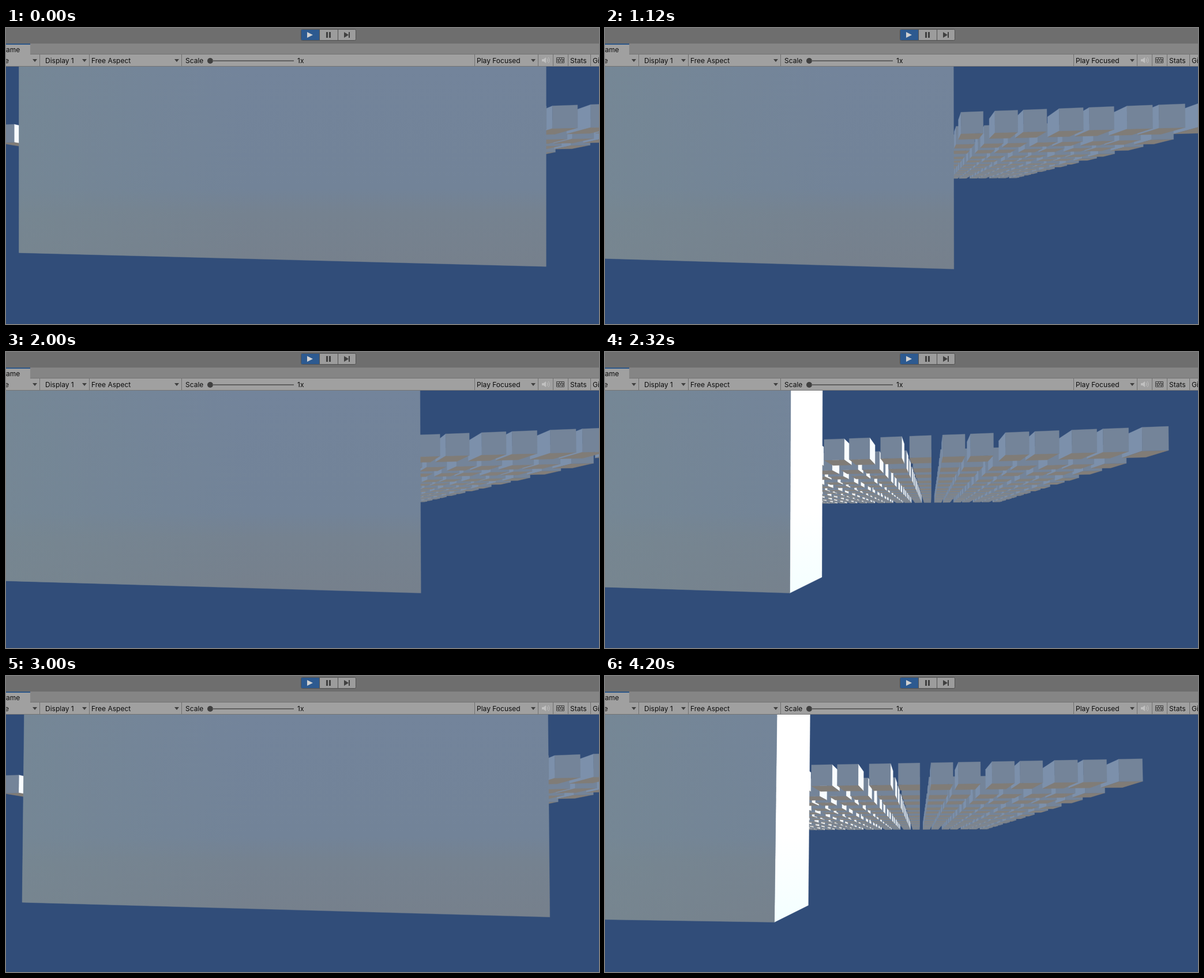
These frames come from a looping animation (1028x514 px, 5200 ms). An HTML page with a canvas:

```html
<!DOCTYPE html>
<html lang="en">
<head>
<meta charset="utf-8">
<title>Game view</title>
<style>
html, body { margin: 0; width: 100%; height: 100%; overflow: hidden; background: #314d79; }
canvas, svg { position: absolute; left: 0; top: 0; display: block; }
text { font: 12px Inter, "Liberation Sans", sans-serif; fill: #0c0c0c; }
</style>
</head>
<body>
<canvas id="view" width="1028" height="514"></canvas>
<svg width="1028" height="67" viewBox="0 0 1028 67">
  <rect width="1028" height="27" fill="#6e6e6e"/>
  <rect y="27" width="1028" height="19" fill="#858585"/>
  <rect y="27" width="42" height="19" fill="#a0a0a0"/>
  <rect y="27" width="42" height="2" fill="#2d5688"/>
  <rect y="46" width="1028" height="21" fill="#a0a0a0"/>
  <path d="M42 45.5H1028M0 66.5H1028" stroke="#747474"/>
  <path d="M58.5 46V66M144.5 46V66M304.5 46V66M812.5 46V66M922.5 46V66M948.5 46V66M974.5 46V66M1013.5 46V66" stroke="#707070"/>
  <rect x="511.500" y="2.500" width="95" height="19" rx="2" fill="#9c9c9c" stroke="#505050"/>
  <rect x="512" y="3" width="31" height="18" fill="#2d5a90"/>
  <path d="M543.500 3V21M575.500 3V21" stroke="#505050"/>
  <path d="M522 7L532 12L522 17Z" fill="#d0d0d0"/>
  <path d="M555 7h3v10h-3zM560 7h3v10h-3zM586 7L594 12L586 17ZM594 7h2v10h-2z" fill="#404040"/>
  <g fill="#404040">
    <path d="M46 54h8l-4 5zM132 54h8l-4 5zM292 54h8l-4 5zM910 54h8l-4 5z"/>
    <circle cx="354" cy="57" r="5"/>
  </g>
  <path d="M358 57H499" stroke="#606060" stroke-width="2"/>
  <path d="M929 54h3l4-3v10l-4-3h-3z" fill="#c0c0c0"/>
  <path d="M938 53q2 3 0 6M940 51q4 5 0 10" fill="none" stroke="#c0c0c0"/>
  <path d="M954.500 51.500h13v9h-13zM954 54.500h14M954 57.500h14M959.500 52v2M963.500 52v2M957.500 55v2M961.500 55v2M965.500 55v2M958.500 58v2M964.500 58v2" fill="none" stroke="#404040"/>
  <text x="0" y="42">ame</text>
  <text x="-2" y="61">e</text>
  <text x="68" y="61">Display 1</text>
  <text x="148" y="61">Free Aspect</text>
  <text x="311" y="61">Scale</text>
  <text x="505" y="61">1x</text>
  <text x="816" y="61">Play Focused</text>
  <text x="978" y="61">Stats</text>
  <text x="1017" y="61">Gi</text>
</svg>
<script>
const g = document.getElementById('view').getContext('2d');
const LOOP = 5200, TICK = 40;
const FOCAL = 390, CX = 526, CY = 293.7;
const YAW = .099, PITCH = .0085, LEFT = -5.22;
const COLS = 24, ROWS = 13;

// Each move: start, end, then poses [strafe, yaw, pitch] at both ends
const at = (strafe, yaw = YAW, pitch = PITCH) => [strafe, yaw, pitch];
const moves = [
  [0, 1, at(LEFT, .0926, 0), at(LEFT, .0926, 0)],
  [400, 401, at(LEFT), at(LEFT)],
  [880, 1400, at(-4.43), at(0)],
  [1480, 1680, at(-2.83), at(LEFT)],
  [1880, 2320, at(-4.6), at(0)],
  [2480, 3000, at(-.58), at(LEFT)],
  [3120, 3640, at(-4.23), at(0)],
  [4000, 4200, at(0, .089, .011), at(0, .0487, .021)]
];

function poseAt(time) {
  const [start, end, from, to] = moves.filter(m => m[0] <= time).pop();
  const k = Math.min(1, (time - start) / (end - start));
  return from.map((v, i) => v + (to[i] - v) * k);
}

let cam;
function setCamera([strafe, yaw, pitch]) {
  cam = {
    x: strafe * Math.cos(YAW), z: strafe * Math.sin(YAW),
    cy: Math.cos(yaw), sy: Math.sin(yaw),
    cp: Math.cos(pitch), sp: Math.sin(pitch)
  };
}

function project([x, y, z]) {
  x -= cam.x;
  z -= cam.z;
  const vx = x * cam.cy + z * cam.sy, vz = z * cam.cy - x * cam.sy;
  const depth = vz * cam.cp + y * cam.sp;
  return [CX + FOCAL * vx / depth, CY - FOCAL * (y * cam.cp - vz * cam.sp) / depth];
}

function face(fill, ...corners) {
  g.beginPath();
  corners.forEach(c => g.lineTo(...project(c)));
  g.closePath();
  g.fillStyle = g.strokeStyle = fill;
  g.fill();
  g.stroke();
}

function box(x0, x1, y0, y1, z0, z1, paint) {
  const side = (fill, x) => face(fill, [x, y0, z0], [x, y1, z0], [x, y1, z1], [x, y0, z1]);
  if (x0 > cam.x) side(paint.left, x0);
  if (x1 < cam.x) side(paint.right, x1);
  if (y0 > 0) face(paint.bottom, [x0, y0, z0], [x1, y0, z0], [x1, y0, z1], [x0, y0, z1]);
  face(paint.front, [x0, y0, z0], [x1, y0, z0], [x1, y1, z0], [x0, y1, z0]);
}

function gradient(x1, y1, stops) {
  const fill = g.createLinearGradient(0, x1 ? 0 : 67, x1, y1);
  stops.forEach(([k, color]) => fill.addColorStop(k, color));
  return fill;
}

// Columns count from the right, and come in pairs
const columnX = i => 8.843 - 2.766 * (i >> 1) - 1.52 * (i % 2) - .12 * (i >> 3) ** 2;
const rowZ = j => 10.35 + 3.66 * (j >> 1) + 2.03 * (j % 2);
const columns = Array.from({ length: COLS }, (_, i) => columnX(i));

const wall = {
  front: gradient(0, 420, [[0, '#73849b'], [.6, '#728398'], [.72, '#758290'], [1, '#76808c']]),
  right: gradient(0, 420, [[0, '#ffffff'], [.6, '#ffffff'], [1, '#f4ffff']])
};
const haze = gradient(420, 0, [[0, 'rgba(119,137,146,.6)'], [1, 'rgba(119,137,146,0)']]);

function draw(time) {
  setCamera(poseAt(time));
  g.lineWidth = .4;
  g.fillStyle = '#314d79';
  g.fillRect(0, 0, 1028, 514);

  const away = x => Math.abs(x + .5 - cam.x);
  columns.sort((a, b) => away(b) - away(a));
  for (let j = ROWS - 1; j >= 0; j--) {
    const z = rowZ(j), k = j / ROWS;
    const paint = {
      front: '#748499', left: '#7c90ab', right: '#f8fcff',
      bottom: `rgb(${128 + 10 * k},${124 + 16 * k},${119 + 22 * k})`
    };
    for (const x of columns) box(x, x + 1, 3.03, 4.03, z, z + 1, paint);
  }

  const slab = [-10.87, -2.04, -1.02, 5, 3.094, 4.06];
  box(...slab, wall);
  const [x0, x1, y0, y1, z0] = slab;
  face(haze, [x0, y0, z0], [x1, y0, z0], [x1, y1, z0], [x0, y1, z0]);
}

const begin = performance.now();
function tick() {
  const time = (performance.now() - begin) % LOOP;
  draw(Math.floor(time / TICK) * TICK);
  requestAnimationFrame(tick);
}
tick();
</script>
</body>
</html>
```
